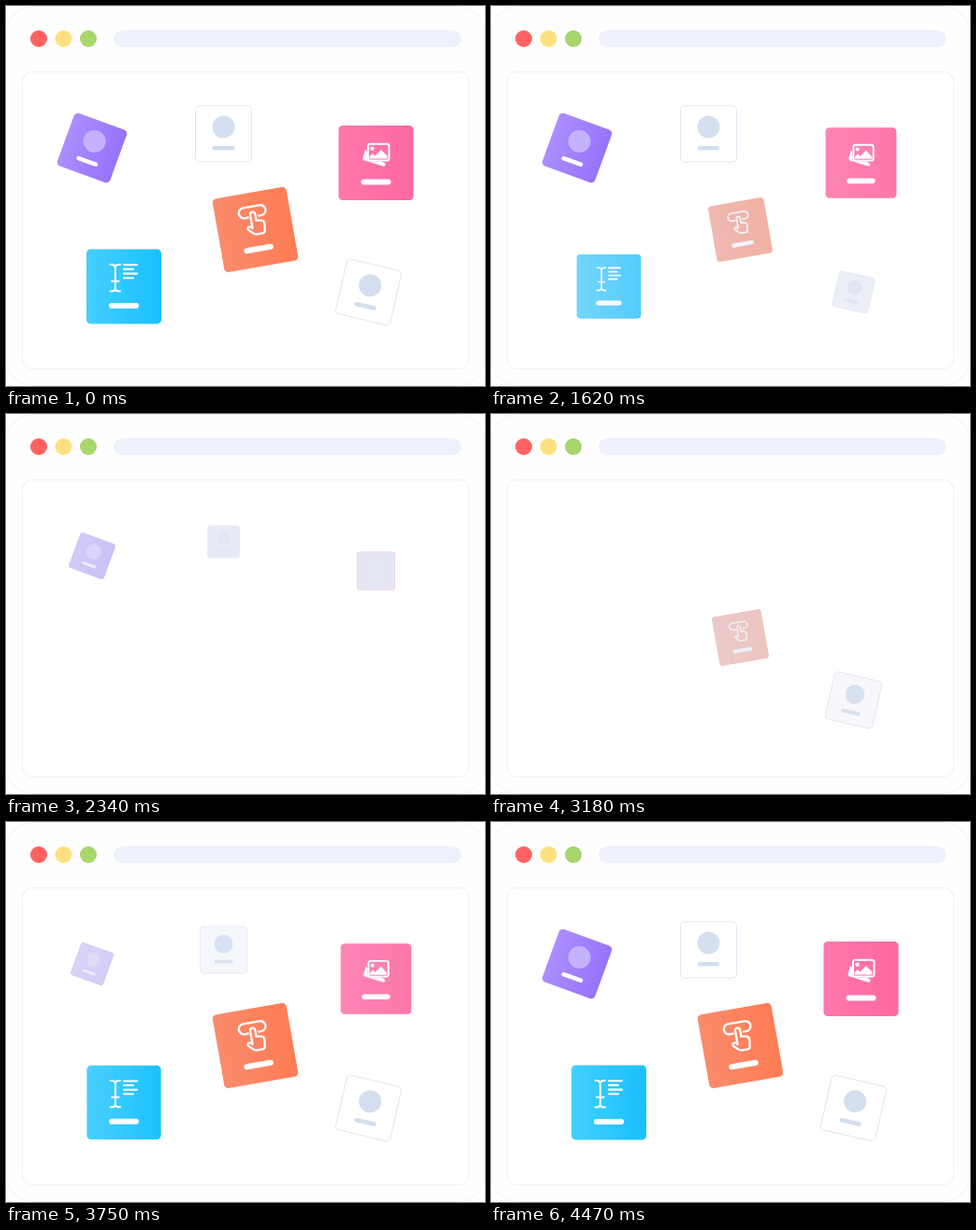
An HTML page with a canvas for the animation above (4500 ms loop, 512 by 407 pixels).

```html
<!DOCTYPE html>
<html lang="en">
<head>
<meta charset="utf-8">
<title>Floating tiles</title>
<style>
  html, body { margin: 0; width: 100%; height: 100%; overflow: hidden; background: #fff; }
  canvas { display: block; width: 512px; height: 407px; }
</style>
</head>
<body>
<canvas id="stage" width="512" height="407"></canvas>
<script>
const ctx = document.getElementById('stage').getContext('2d');
const LOOP = 4500, STAGGER = 150;
const OUT = { start: 1020, length: 900 };
const IN = { start: 2885, length: 690 };
const GHOST = '#e5e7f5';

const clamp = v => Math.min(1, Math.max(0, v));

// cubic-bezier(x1, y1, x2, y2) solved by bisection
function bezier(x1, y1, x2, y2) {
  const at = (a, b, s) => 3 * a * s * (1 - s) ** 2 + 3 * b * s * s * (1 - s) + s ** 3;
  return x => {
    let lo = 0, hi = 1;
    for (let i = 0; i < 24; i++) {
      const mid = (lo + hi) / 2;
      if (at(x1, x2, mid) < x) lo = mid; else hi = mid;
    }
    return at(y1, y2, (lo + hi) / 2);
  };
}
const easeIn = bezier(0.25, 0.1, 0.25, 1);
const easeOut = x => 0.3 * (1 - Math.cos(Math.PI * x)) + 0.4 * x;

function box(x, y, w, h, r, fill, stroke) {
  ctx.beginPath();
  ctx.roundRect(x, y, w, h, r);
  if (fill) { ctx.fillStyle = fill; ctx.fill(); }
  if (stroke) { ctx.strokeStyle = stroke; ctx.stroke(); }
}

function disc(x, y, r, fill) {
  ctx.beginPath();
  ctx.arc(x, y, r, 0, 2 * Math.PI);
  ctx.fillStyle = fill;
  ctx.fill();
}

function bar(y, w, h, fill) {
  box(-w / 2, y - h / 2, w, h, h / 2, fill);
}

function line(path, width) {
  ctx.lineWidth = width;
  ctx.strokeStyle = '#fff';
  ctx.stroke(path);
}

const cursorPath = new Path2D(
  'M-14.5 -23.5 H-13 Q-9.2 -23.5 -9.2 -20 V1.5 Q-9.2 5 -13 5 H-14.5' +
  'M-4 -23.5 H-5.4 Q-9.2 -23.5 -9.2 -20 M-9.2 1.5 Q-9.2 5 -5.4 5 H-4 M-13 -5.7 H-5.4');
const textPath = new Path2D('M0 -23.2 H14 M0 -18.5 H10 M0 -13.8 H14 M0 -9.2 H10');
const backPath = new Path2D('M-11.5 -14 L-14 -5.5 Q-14.5 -3 -12 -2.4 L8 3.8 Q10 4.2 10.3 1 Z');
const hillPath = new Path2D('M-7 -4.5 V-7 L-3.5 -10 L-1 -7.5 L5.5 -14 L12 -7.5 V-4.5 Z');
const pillPath = new Path2D('M-5.5 -14 H-9 A5.5 5.5 0 0 1 -9 -25 H9 A5.5 5.5 0 0 1 9 -14 H6');
const handPath = new Path2D(
  'M-2.6 -2 V-16.5 A2.6 2.6 0 0 1 2.6 -16.5 V-9.5 L8 -8.6 Q11.2 -7.8 10.8 -4.5' +
  'L9.8 3 Q9.4 5.2 7 5.2 H1 Q-1 5.2 -2.4 3.8 L-7.6 -1 Q-8.4 -4.4 -4.8 -4 Z');

const draw = {
  person(tint) {
    disc(0, -7.5, 12, tint[0]);
    bar(15.3, 24, 4.6, tint[1]);
  },
  text() {
    line(cursorPath, 2);
    line(textPath, 2.1);
    bar(20.6, 32, 6, '#fff');
  },
  photo() {
    ctx.fillStyle = '#fff';
    ctx.fill(backPath);
    box(-9.5, -21.5, 24.5, 20, 3, '#ff72a8');
    ctx.lineWidth = 2;
    box(-8.5, -20.3, 22.5, 17.8, 2.5, null, '#fff');
    disc(-4, -15.3, 2.2, '#fff');
    ctx.fillStyle = '#fff';
    ctx.fill(hillPath);
    bar(20.4, 32, 6, '#fff');
  },
  tap() {
    line(pillPath, 2.3);
    line(handPath, 2.3);
    bar(20.8, 32, 6, '#fff');
  }
};

const pale = ['#d3dfee', '#d3dfee'];
const violet = ['#c5b2ff', '#ffffff'];
const tiles = [
  { x: 387.5, y: 306.5, size: 60, turn: 13, fill: ['#fff', '#fff'], edge: '#e2e4f2', icon: 'person', tint: pale },
  { x: 266.5, y: 239.5, size: 80, turn: -10, fill: ['#fa8b6c', '#ff7c54'], icon: 'tap' },
  { x: 126, y: 300.4, size: 80, turn: 0, fill: ['#45cfff', '#18c0ff'], icon: 'text' },
  { x: 395.5, y: 168, size: 80, turn: 0, fill: ['#ff78ac', '#ff68a1'], icon: 'photo' },
  { x: 232.5, y: 137, size: 60, turn: 0, fill: ['#fff', '#fff'], edge: '#e2e4f2', icon: 'person', tint: pale },
  { x: 92, y: 152, size: 60, turn: 20, fill: ['#ab8eff', '#9773fa'], icon: 'person', tint: violet }
];

// 1 = full tile, 0 = half-size ghost, null = hidden
function presence(t, i) {
  const delay = i * STAGGER;
  const enter = t - IN.start - delay;
  if (enter >= 0) return easeIn(clamp(enter / IN.length));
  const leave = (t - OUT.start - delay) / OUT.length;
  return leave >= 1 ? null : 1 - easeOut(clamp(leave));
}

function drawTile(tile, p) {
  const half = tile.size / 2, scale = 0.5 + p / 2;
  ctx.save();
  ctx.translate(tile.x, tile.y);
  ctx.rotate(tile.turn * Math.PI / 180);
  ctx.scale(scale, scale);
  ctx.lineCap = ctx.lineJoin = 'round';
  ctx.lineWidth = 1;
  const shade = ctx.createLinearGradient(-half, 0, half, 0);
  tile.fill.forEach((c, i) => shade.addColorStop(i, c));
  box(-half, -half, tile.size, tile.size, 4.5, shade, tile.edge);
  draw[tile.icon](tile.tint);
  if (p < 1) {
    const pad = tile.edge ? 0.5 : 0;
    ctx.globalAlpha = 1 - p;
    box(-half - pad, -half - pad, tile.size + 2 * pad, tile.size + 2 * pad, 4.5, GHOST);
  }
  ctx.restore();
}

function drawWindow() {
  ctx.fillStyle = '#fff';
  ctx.fillRect(0, 0, 512, 407);
  ctx.lineWidth = 1;
  box(0.5, 0.5, 511, 406, 28, '#fefefe', '#f3f3fa');
  disc(35, 35, 9, '#ff6262');
  disc(61.5, 35, 9, '#ffdf81');
  disc(88, 35, 9, '#a6d66c');
  box(115, 26, 371.5, 18, 9, '#eef1fb');
  box(17.5, 70.5, 477, 318, 10, '#fff', '#eeeef8');
}

function frame() {
  const t = performance.now() % LOOP;
  drawWindow();
  tiles.forEach((tile, i) => {
    const p = presence(t, i);
    if (p !== null) drawTile(tile, p);
  });
  requestAnimationFrame(frame);
}
frame();
</script>
</body>
</html>
```
